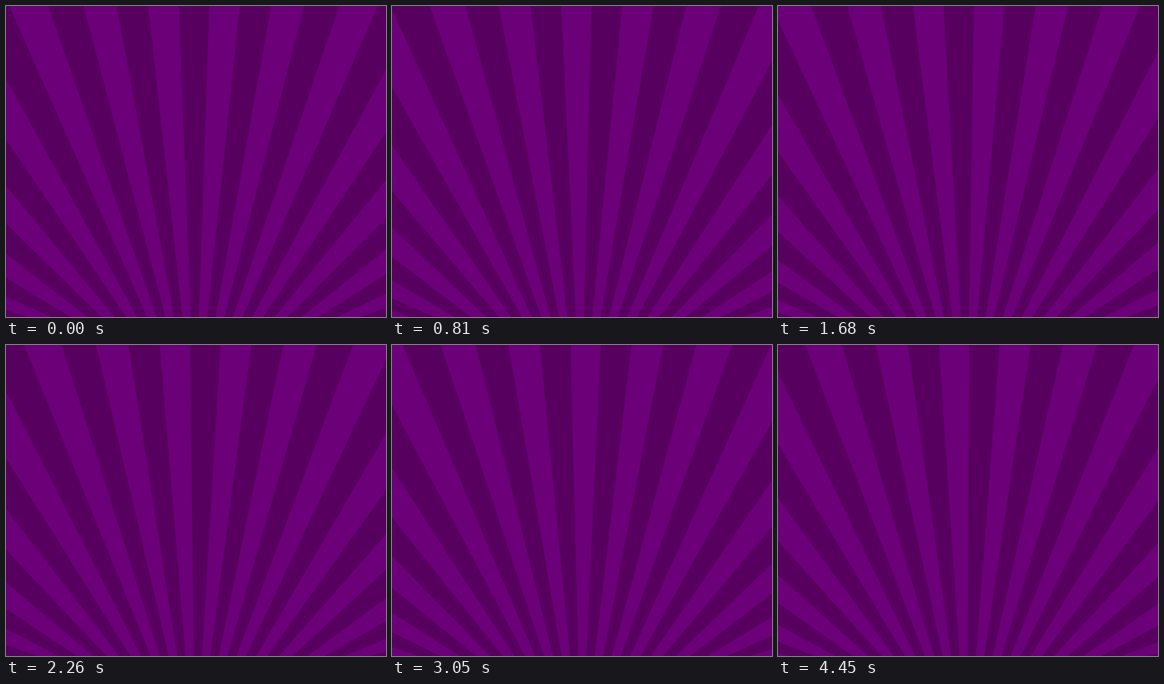
Write an HTML page that moves like this. It is 827 px wide and 677 px high and loops after 4510 ms.

```html
<!DOCTYPE html>
<html lang="en">
<head>
<meta charset="utf-8">
<title>Turning sunburst</title>
<style>
  html, body { margin: 0; width: 100%; height: 100%; overflow: hidden; background: #580060; }
  svg { display: block; width: 100%; height: 100%; }
</style>
</head>
<body>
<svg viewBox="0 0 827 677" preserveAspectRatio="none">
  <rect width="827" height="677" fill="#580060"/>
  <path id="rays" fill="#6b0078"/>
</svg>
<script>
const LOOP = 4510, STEP = 65.8;        // ms
const FIRST = 0.437, TURN = 0.0677;    // ray widths: at the start, per step
const H = 677, LIMIT = 15.5;
const rays = document.getElementById('rays');

const tan = deg => Math.tan(deg * Math.PI / 180);
const clamp = p => Math.max(-LIMIT, Math.min(LIMIT, p));

// Where ray edge p meets the top and the bottom of the stage
const topX = p => (413.5 + 687 * tan(5.5 * p)).toFixed(2);
const bottomX = p => (412.2 + 250 * tan(4.1 * p)).toFixed(2);

// Steps come slightly faster during the first half second
function stepAt(t) {
  const lead = 55 * Math.min(1, t / 540);
  return Math.floor((t + lead) / STEP);
}

function draw(turn) {
  let d = '';
  for (let p = turn % 2 - 18; p < LIMIT; p += 2) {
    const a = clamp(p), b = clamp(p + 1);
    if (a < b) d += `M${topX(a)} 0L${topX(b)} 0L${bottomX(b)} ${H}L${bottomX(a)} ${H}Z`;
  }
  rays.setAttribute('d', d);
}

const start = performance.now();
function tick(now) {
  const t = Math.max(0, now - start) % LOOP;
  draw(FIRST + TURN * stepAt(t));
  requestAnimationFrame(tick);
}
tick(start);
</script>
</body>
</html>
```
